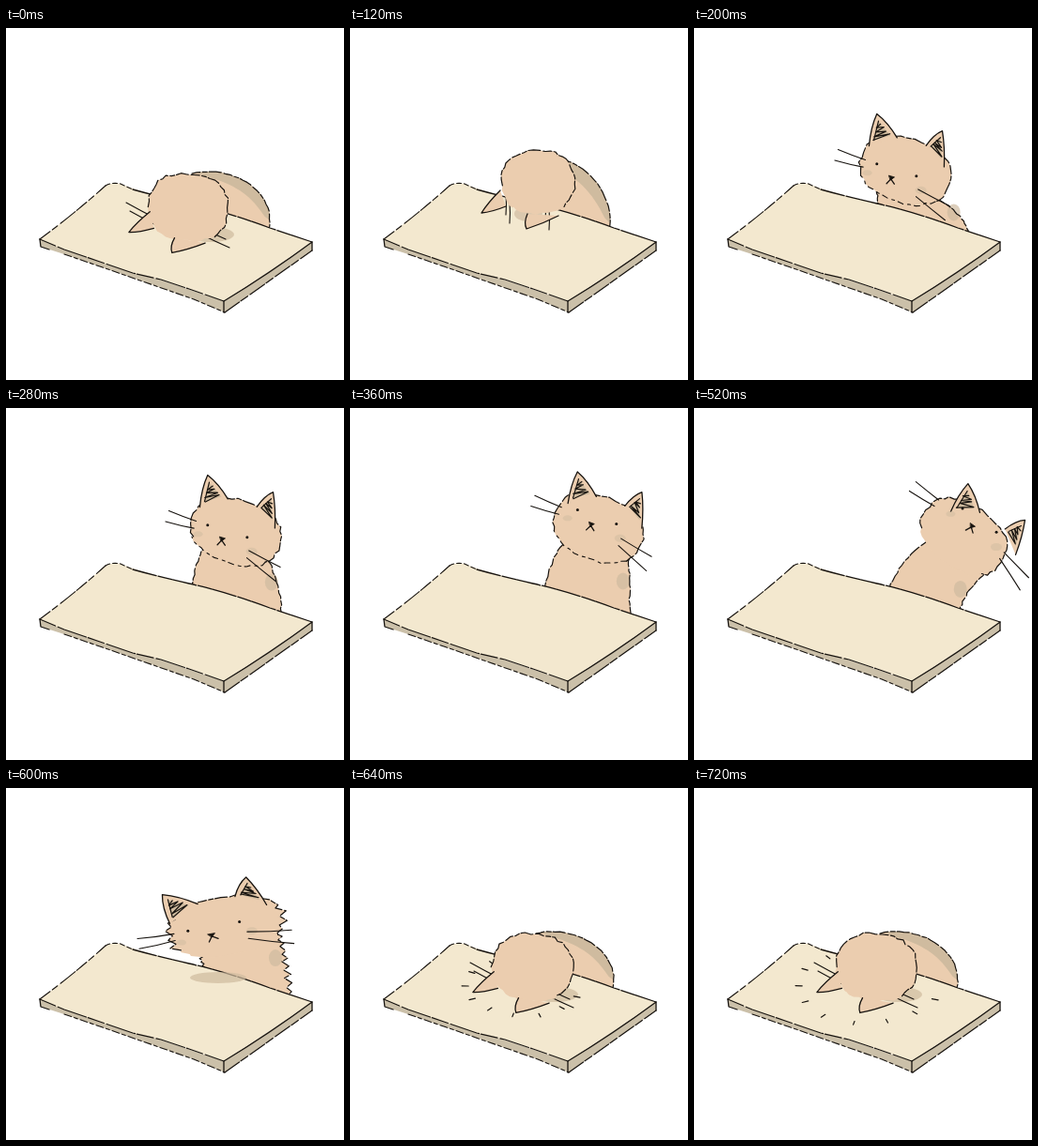
Recreate the animation shown at these times as an HTML page. Size 360 by 375 pixels, loop 760 ms.

```html
<!DOCTYPE html>
<html lang="en">
<head>
<meta charset="utf-8">
<title>Cat at a table</title>
<style>
html, body { margin: 0; width: 100%; height: 100%; overflow: hidden; background: #fff; }
svg { display: block; width: 100vw; height: 100vh; }
</style>
</head>
<body>
<svg id="stage" viewBox="0 0 360 375" fill="none" stroke-linecap="round" stroke-linejoin="round"></svg>
<script>
const stage = document.getElementById('stage');
const FUR = '#ebcdaf', SHADE = '#cfbb9f', TOP = '#f3e8cf', SIDE = '#cbc0a9', INK = '#17130f';
const STEP = 40, COUNT = 19, IMPACT = 16, RAD = Math.PI / 180;

// Head seen from behind: hump is the back's centre and radii, sweep spreads the whiskers.
const down = { x: 194, y: 191, rx: 43, ry: 36, rot: 6, hx: 215, hy: 205, hw: 66, hh: 52, sweep: 1 };
const lift = { x: 200, y: 164, rx: 39, ry: 34, rot: 0, hx: 210, hy: 208, hw: 67, hh: 70, sweep: 0 };
// Head seen from the front: lx, ly shift the face; left and right are where the body meets the table.
const sit = { x: 245, y: 132, rx: 49, ry: 34, rot: 17, lx: -9, ly: 2, left: 197, right: 294, smear: 0, chin: 1 };
const rise = { ...sit, x: 264, y: 128, rot: 20, lx: -5, ly: -11, left: 206, right: 298 };
const lean = { ...rise, x: 287, y: 137, rot: 35, lx: 4, ly: -24, right: 282, chin: 0 };
const drop = { ...lean, x: 234, y: 147, rx: 62, ry: 31, rot: -10, lx: -10, ly: -2, left: 212, right: 302, smear: 3 };

const keys = [
  [0, down], [3, lift], [4, { ...lift, x: 209, y: 155 }],
  [5, { ...sit, x: 225, y: 152 }], [7, sit], [9, rise], [13, lean], [15, drop],
  [IMPACT, down], [COUNT, down]
];

let seed = 1;
const rnd = () => (seed = seed * 16807 % 2147483647) / 2147483647 - .5;
const lerp = (a, b, k) => a + (b - a) * k;
const mix = (p, q, k) => [lerp(p[0], q[0], k), lerp(p[1], q[1], k)];
const line = p => 'M' + p.map(q => q[0].toFixed(1) + ' ' + q[1].toFixed(1)).join('L');
const path = (d, style) => `<path d="${d}" ${style}/>`;
const fill = c => `fill="${c}"`;
const ink = (w = 1.2, more = '') => ` stroke="${INK}" stroke-width="${w}" ${more}`;
const dash = (...n) => `stroke-dasharray="${n.join(' ')}"`;
const FLUFF = dash(9, 2.5, 5, 2, 13, 3);
const blob = ([x, y], rx, ry, o) =>
  `<ellipse cx="${x}" cy="${y}" rx="${rx}" ry="${ry}" fill="${SHADE}" opacity="${o}"/>`;

function poseAt(i) {
  const n = keys.findIndex(([at], j) => i >= at && i < keys[j + 1][0]);
  const [[from, a], [to, b]] = [keys[n], keys[n + 1]];
  const t = (i - from) / (to - from), k = t * t * (3 - 2 * t), out = {};
  for (const name in a) out[name] = lerp(a[name], b[name] ?? a[name], k);
  return out;
}

// Maps head coordinates (u across, v down) to the stage.
const placer = p => (u, v) => {
  const c = Math.cos(p.rot * RAD), s = Math.sin(p.rot * RAD);
  return [p.x + u * c - v * s, p.y + u * s + v * c];
};

function arc(from, to, step, at) {
  const out = [];
  for (let d = from; d <= to; d += step) out.push(at(d * RAD));
  return out;
}

// Fluffy, slightly square oval, from start degrees to start + 360.
function outline(p, put, start) {
  const round = v => Math.sign(v) * Math.abs(v) ** .88;
  let n = 0;
  return arc(start, start + 360, 7.5, a => {
    const r = 1 + rnd() * .07, [x, y] = put(p.rx * r * round(Math.cos(a)), p.ry * r * round(Math.sin(a)));
    return [x + (p.smear || 0) * Math.cos(a) * (n++ % 2 ? 1 : -1), y];
  });
}

// Body edge from the table up to the neck.
function flank(foot, neck, smear) {
  const bend = [lerp(foot[0], neck[0], .15), lerp(foot[1], neck[1], .6)];
  return Array.from({ length: 17 }, (_, i) => {
    const k = i / 16, [x, y] = mix(mix(foot, bend, k), mix(bend, neck, k), k);
    return [x + rnd() * 2 + smear * (i % 2 ? 1 : -1), y + rnd()];
  });
}

function ear(a, tip, b, inner) {
  const mid = mix(a, b, .5);
  const bulge = p => mix(mid, mix(p, tip, .5), 1.22);
  let s = path(`M${a}Q${bulge(a)} ${tip}Q${bulge(b)} ${b}`, fill(FUR) + ink(1.3));
  if (!inner) return s;
  const heart = mix(mid, tip, .35), [u, v, w] = [a, tip, b].map(p => mix(heart, p, .6));
  s += path(line([u, v, w]) + 'Z', fill(SHADE));
  const marks = Array.from({ length: 8 }, (_, i) => {
    const [x, y] = mix(i % 2 ? w : u, v, i / 9);
    return [x + rnd() * 2, y + rnd() * 2];
  });
  return s + path(line(marks), ink()) + path(line([u, v]), ink());
}

const hair = (a, b) => path(`M${a}Q${mix(a, b, .5).map(v => v + 1)} ${b}`, ink(1.1));

const edge = 'M36 225L62 236L100 249L135 261L165 268L195 278L232 291';
const board =
  path('M36 225L232 291L326 228V237L233 303L200 289L140 268L62 241L37 233Z', fill(SIDE)) +
  path(edge + 'L326 228L281 213Q235 196 195 187Q140 174 122 166Q113 164 106 168Q70 200 36 225Z', fill(TOP)) +
  path('M36 225Q70 200 106 168', ink(1.1, dash(14, 3, 7, 4, 20, 2))) +
  path('M106 168Q113 164 122 166L135 172', ink(1.1, dash(5, 3))) +
  path('M135 172Q160 179 195 187Q235 196 281 213L326 228', ink(1.3, dash(26, 2, 15, 1))) +
  path(edge, ink(1.2, dash(18, 3, 32, 2))) +
  path('M62 241L100 254L140 268L200 289L233 303', ink(1.1, dash(8, 3, 4, 3))) +
  path('M36 225L37 233L46 236M232 291V303M326 228V237M232 291Q280 262 326 228', ink(1.3)) +
  path('M233 303L326 237', ink(1.2, dash(19, 2, 9, 3)));

// Ticks flying out from the hit.
function burst(k) {
  let s = '';
  for (let d = 20; d < 240; d += 27) {
    const a = d * RAD, r = k + rnd() * .08;
    const at = m => [185 + 71 * m * Math.cos(a), 212 + 36 * m * Math.sin(a)];
    s += path(line([at(r), at(r + .1)]), ink());
  }
  return s;
}

function backView(p, i) {
  const put = placer(p);
  const rim = k => a => [p.hx + p.hw * k * Math.cos(a), p.hy + p.hh * k * Math.sin(a)];
  const hump = arc(-105, 12, 4.5, a => rim(1 + rnd() * .015)(a));
  const under = arc(-100, 0, 5, a => rim(1 - .2 * Math.sin((a / RAD + 100) * 1.8 * RAD) ** .5)(a));
  let s = path(line([...hump, [p.hx, p.hy]]) + 'Z', fill(FUR)) +
    path(line([...hump.slice(1, 24), ...under.reverse()]) + 'Z', fill(SHADE)) +
    path(line(hump), ink(1.2, FLUFF)) + board;
  s += blob([p.x - 10 + 34 * p.sweep, p.y + 34 - 5 * p.sweep], 15 + 10 * p.sweep, 8, .7);
  if (i >= IMPACT) s += burst(lerp(.8, 1, (i - IMPACT) / 2));
  for (const side of [-1, 1]) for (const n of [0, 1]) {
    const root = [p.x + (side < 0 ? -34 : 12) - side * 4 * n, p.y + (side < 0 ? 12 : 28) - side * 9 * n];
    s += hair(root, [root[0] + side * 32 * p.sweep, root[1] + 23 - (side < 0 ? 40 : 8) * p.sweep]);
  }
  const head = outline(p, put, 130);
  return s + path(line(head), fill(FUR)) + path(line(head.slice(6, 38)), ink(1.2, FLUFF)) +
    ear(put(-40, 9), put(-60, 33), put(-34, 26)) + ear(put(-11, 34), put(-12, 50), put(22, 36));
}

function frontView(p) {
  const wide = p.rx / 49, tall = p.ry / 34;
  const place = placer(p), put = (u, v) => place(u * wide, v * tall);
  const left = flank([p.left, 202], put(-27, 21), p.smear / 2);
  const right = flank([p.right, 222], put(42, 19), p.smear);
  let s = path(line([...left, ...right.reverse()]) + 'Z', fill(FUR)) +
    blob([right[8][0] - 7, right[8][1] - 4], 7, 9, .7) +
    path(line(left) + line(right), ink(1.2, FLUFF)) + board +
    blob([p.x - 8, p.y + 55], 30, 6, (p.smear / 3) ** 3 * .7);
  const head = outline(p, place, 150);
  s += path(line(head), fill(FUR)) + path(line(head.slice(0, 34)), ink(1.2, FLUFF)) +
    path(line(head.slice(33)), ink(1.1, dash(6, 4, 3, 5) + ` opacity="${p.chin}"`));

  const turn = p.lx * 1.4 + 9;
  const shift = (u, v) => put(u + turn, v);
  s += ear(shift(-41, -14), shift(-43, -49), shift(-15, -31), true) +
    ear(shift(17, -32), shift(29, -52), shift(42, -16), true);

  const look = (u, v) => put(u + p.lx, v + p.ly);
  s += blob(look(-29, 12), 5, 3, .5) + blob(look(31, 13), 6, 4, .5);
  for (const u of [-22, 22]) {
    const [x, y] = look(u, 0);
    s += `<circle cx="${x}" cy="${y}" r="1.5" fill="${INK}"/>`;
  }
  s += path(line([look(-6, 8), look(0, 8), look(-3, 12)]) + 'Z', fill(INK) + ink(.8)) +
    path(line([look(-6, 17), look(-3, 11), look(2, 15)]), ink(1.3));
  for (const n of [-1, 1]) {
    const v = p.ly * .7 + 4, w = p.ly + 17;
    s += hair(put(-44, v + 4 * n), put(-75, v + 6 * n)) +
      hair(put(37 + 2 * p.lx, w + 4 * n), put(74 + 2 * p.lx, w + 11 + 8 * n));
  }
  return s;
}

function draw(i) {
  seed = 977 + i * 131;
  const p = poseAt(i);
  stage.innerHTML = 'sweep' in p ? backView(p, i) : frontView(p);
}

let start, shown = 0;
function tick(now) {
  start ??= now;
  const i = Math.floor(Math.max(0, now - start) / STEP) % COUNT;
  if (i !== shown) draw(shown = i);
  requestAnimationFrame(tick);
}
draw(0);
requestAnimationFrame(tick);
</script>
</body>
</html>
```
